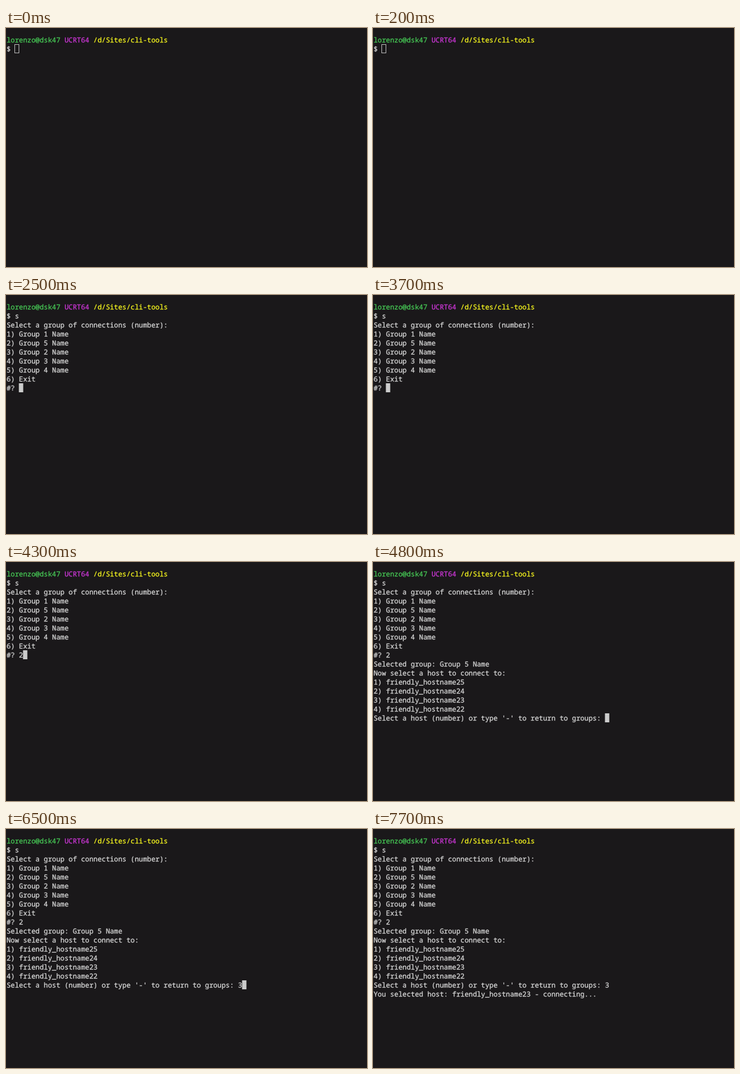
Write an HTML page with a canvas that moves like this. It is 600 px wide and 398 px high and loops after 8 s.

```html
<!DOCTYPE html>
<html lang="en">
<head>
<meta charset="utf-8">
<title>Terminal session</title>
<style>
  html, body { margin: 0; width: 100%; height: 100%; overflow: hidden; background: #1a181a; }
  canvas { display: block; }
</style>
</head>
<body>
<canvas id="screen" width="600" height="398"></canvas>
<script>
const ctx = document.getElementById('screen').getContext('2d');
const LOOP = 8000;
const CELL = 6.87, LINE = 15, LEFT = 1, TOP = 12, BASELINE = 12;
const COLORS = { back: '#1a181a', text: '#d6d6d6', user: '#46c855', system: '#cc36d6', path: '#f5f51e' };

// Everything the session prints, as [time, text, color].
const output = [
  [0, 'lorenzo@dsk47 ', COLORS.user],
  [0, 'UCRT64 ', COLORS.system],
  [0, '/d/Sites/cli-tools\n', COLORS.path],
  [0, '$ '],
  [1900, 's'],
  [2500, '\nSelect a group of connections (number):\n' +
    [1, 5, 2, 3, 4].map((group, i) => `${i + 1}) Group ${group} Name\n`).join('') +
    '6) Exit\n#? '],
  [4300, '2'],
  [4800, '\nSelected group: Group 5 Name\nNow select a host to connect to:\n' +
    [25, 24, 23, 22].map((host, i) => `${i + 1}) friendly_hostname${host}\n`).join('') +
    "Select a host (number) or type '-' to return to groups: "],
  [6500, '3'],
  [7000, '\nYou selected host: friendly_hostname23 - connecting...\n']
];

// Cursor style from each moment on.
const cursorStates = [
  [0, 'hollow'], [1600, 'solid'], [3100, 'hidden'], [3700, 'solid'],
  [5400, 'hidden'], [6100, 'solid'], [7700, 'hidden']
];

function drawCursor(style, x, y) {
  if (style === 'solid') {
    ctx.fillStyle = '#cccccc';
    ctx.fillRect(x - 0.2, y, 7.2, LINE);
  } else if (style === 'hollow') {
    ctx.strokeStyle = '#b8b8b8';
    ctx.lineWidth = 1;
    ctx.strokeRect(Math.floor(x) + 0.5, y + 0.5, 7, LINE - 1);
  }
}

// A hairline outline gives the glyphs their slightly heavy weight.
function drawChar(char, x, y) {
  ctx.fillText(char, x, y);
  ctx.strokeText(char, x, y);
}

function draw(time) {
  ctx.fillStyle = COLORS.back;
  ctx.fillRect(0, 0, 600, 398);
  ctx.font = '11.45px "Noto Sans Mono", "DejaVu Sans Mono", monospace';
  ctx.textRendering = 'geometricPrecision';
  ctx.lineWidth = 0.3;

  let column = 0, row = 0;
  for (const [start, text, color = COLORS.text] of output) {
    if (time < start) break;
    ctx.fillStyle = ctx.strokeStyle = color;
    for (const char of text) {
      if (char === '\n') {
        column = 0;
        row++;
      } else {
        drawChar(char, LEFT + column * CELL, TOP + row * LINE + BASELINE);
        column++;
      }
    }
  }

  const [, style] = cursorStates.filter(([start]) => time >= start).pop();
  drawCursor(style, LEFT + column * CELL, TOP + row * LINE);
}

function tick() {
  draw(performance.now() % LOOP);
  requestAnimationFrame(tick);
}
tick();
</script>
</body>
</html>
```
